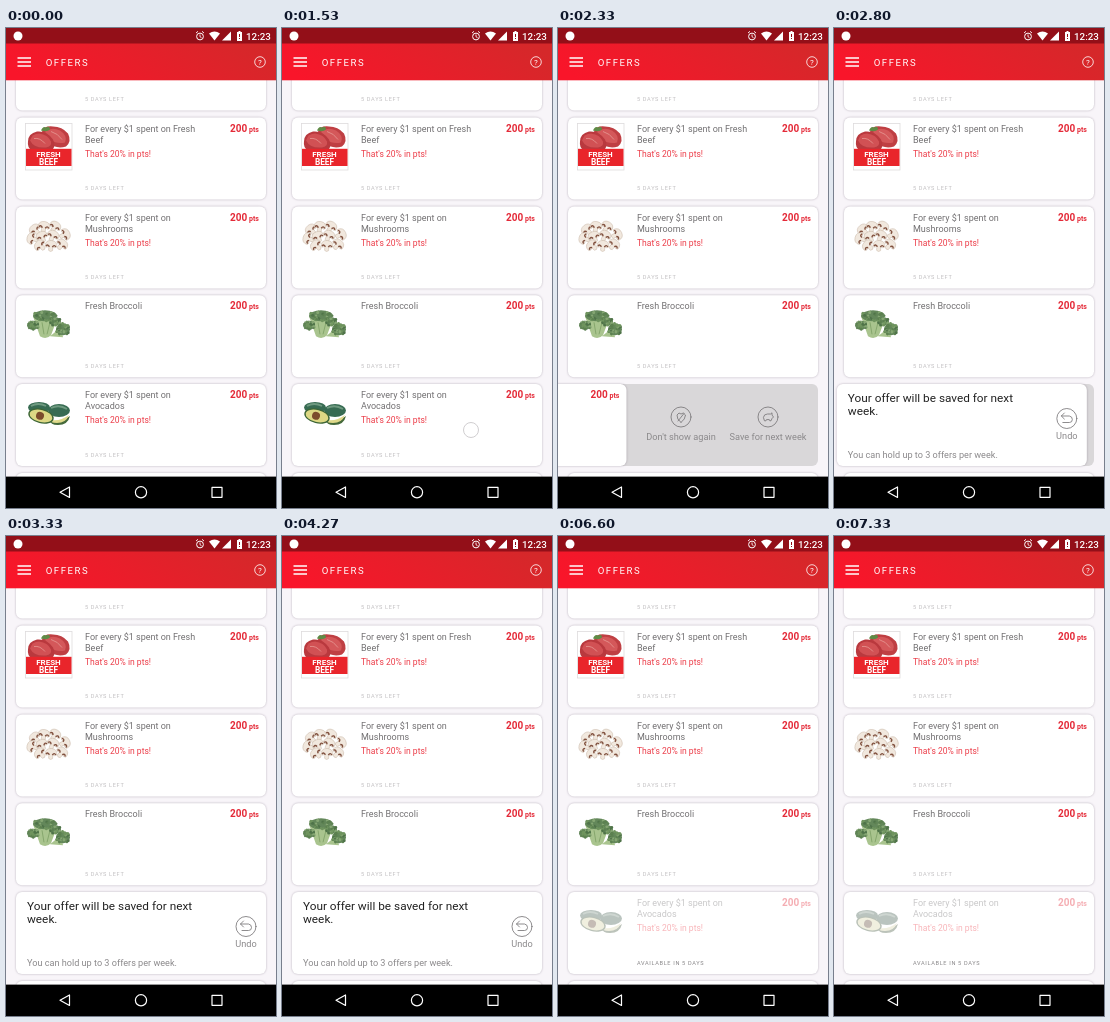
Write an HTML page that moves like this. It is 270x480 px and loops after 7540 ms.

```html
<!DOCTYPE html>
<html lang="en">
<head>
<meta charset="utf-8">
<title>Offers</title>
<style>
  html, body { margin: 0; width: 100%; height: 100%; overflow: hidden; background: #f8f5f9; }
  svg { display: block; width: 270px; height: 480px; font-family: Roboto, "Noto Sans", sans-serif; }
  .face { fill: #fff; filter: drop-shadow(0 .8px 1.1px rgba(70, 52, 76, .34)); }
  .title { font-size: 9px; fill: #727072; }
  .bonus { font-size: 8.55px; fill: #ec3d49; }
  .note { font-size: 5.6px; letter-spacing: .65px; fill: #c0bec0; }
  .pts { font-size: 10px; font-weight: 700; fill: #e42a38; }
  .unit { font-size: 7px; }
  .label { font-size: 9.2px; fill: #8b898b; text-anchor: middle; }
  .line { fill: none; stroke: #7a787a; stroke-width: .85; stroke-linecap: round; stroke-linejoin: round; }
  .white { fill: none; stroke: #fff; }
  .dim { opacity: .38; }
</style>
</head>
<body>
<svg viewBox="0 0 270 480">
  <defs>
    <linearGradient id="bar" x1="0" y1=".6" x2="1" y2=".4">
      <stop offset="0" stop-color="#f9152a"/>
      <stop offset="1" stop-color="#d5282a"/>
    </linearGradient>
    <g id="beef">
      <rect x="9.500" y="6" width="46.500" height="46.500" fill="#fff" stroke="#dedbdd" stroke-width=".8"/>
      <path d="M26 14 Q28 8 37 9 Q46 9 52 16 Q56 24 50 29 Q40 32 32 25Z" fill="#bf3f43"/>
      <path d="M29 14 Q36 9 44 13 Q52 18 49 25 Q41 27 34 22Z" fill="#d4585a"/>
      <path d="M12 24 Q12 16 21 14 Q31 13 37 22 Q40 29 36 33 L16 33 Q11 30 12 24Z" fill="#b9393e"/>
      <path d="M14 23 Q16 16 23 16 Q32 17 35 24 Q36 29 30 30 Q18 31 14 23Z" fill="#d15154"/>
      <path d="M18 21 Q24 20 29 26 M35 14 Q42 16 46 22" fill="none" stroke="#e89a95" stroke-width=".8"/>
      <path d="M25 13 Q27 8 30 10 Q34 8 34 12 Q31 15 25 13Z" fill="#5f8b46"/>
      <rect x="10" y="31.300" width="45.500" height="17.200" fill="#e9252b"/>
      <g font-weight="700" fill="#fff" text-anchor="middle">
        <text x="32.500" y="39.300" font-size="8">FRESH</text>
        <text x="32.500" y="47.400" font-size="8.300">BEEF</text>
      </g>
    </g>
    <g id="slice">
      <path d="M-6 1 Q-6 -5 0 -5 Q6 -5 6 1 Q4 3 2 1 L2 5 Q0 7 -2 5 L-2 1 Q-4 3 -6 1Z" fill="#f1e8de" stroke="#c9b8a8" stroke-width=".5"/>
      <path d="M-5 1 Q-3 -1.500 -1.500 1.500 M5 1 Q3 -1.500 1.500 1.500" fill="none" stroke="#80503e" stroke-width="1.400"/>
    </g>
    <g id="avocado">
      <g fill="#376b52">
        <ellipse cx="23" cy="23.500" rx="11" ry="5.500"/>
        <ellipse cx="43" cy="26.500" rx="11" ry="6.500"/>
      </g>
      <path d="M15 22 Q22 18 30 22 M35 24 Q43 20 51 25" fill="none" stroke="#6f9a80" stroke-width="1.800"/>
      <path d="M34 36 Q43 40 54 32 Q52 41 42 41 Q34 41 34 36Z" fill="#45693a"/>
      <path d="M32 35 Q42 39 53 31 Q50 39 41 39 Q34 39 32 35Z" fill="#dfd98a"/>
      <g transform="rotate(14 25 32)">
        <ellipse cx="25" cy="32" rx="13" ry="7.300" fill="#3d6636"/>
        <ellipse cx="25" cy="32" rx="11.600" ry="6" fill="#ddd884"/>
        <circle cx="24" cy="32" r="4" fill="#7c4c2c"/>
      </g>
    </g>
    <g id="mushroom"></g>
    <g id="broccoli"></g>
  </defs>

  <rect width="270" height="480" fill="#f8f5f9"/>
  <g id="list"></g>

  <g id="panel" transform="translate(10 356)">
    <rect width="250" height="82" rx="6" fill="#d9d7d9"/>
    <g class="line">
      <circle cx="113" cy="33" r="10"/>
      <path d="M113 38.500 Q108.500 35 109 31 Q111 27.500 113 30 Q115.500 27.500 117.500 31 Q117.500 35 113 38.500 M116 29.500 L110 37"/>
      <circle cx="200" cy="33" r="10"/>
      <path d="M195.500 33 Q196 30 199.500 30 L202.500 30 L204 28.800 L204 31 L205.500 33 L204 34.500 L203 36.800 L201.800 36.800 L201.300 35.600 L198.500 35.600 L198 36.800 L196.800 36.800Z"/>
    </g>
    <text class="label" x="113" y="56.300">Don't show again</text>
    <text class="label" x="200" y="56.300">Save for next week</text>
  </g>

  <g id="moving"></g>
  <g id="resting"></g>

  <g id="message">
    <rect class="face" width="250" height="82" rx="6"/>
    <g font-size="11.800" fill="#222">
      <text x="11" y="17.500">Your offer will be saved for next</text>
      <text x="11" y="31">week.</text>
    </g>
    <text x="11" y="74" font-size="9.150" fill="#8b898b">You can hold up to 3 offers per week.</text>
    <g class="line">
      <circle cx="230" cy="34.500" r="10"/>
      <path d="M227.500 29 L224.500 32 L227.500 35 M224.500 32 L232.500 32 Q235.500 32.500 235.500 35.500 Q235.500 38.500 232.500 38.500 L226 38.500"/>
    </g>
    <text class="label" x="230" y="55">Undo</text>
  </g>

  <circle id="touch" r="7.500" fill="#fff" fill-opacity=".65" stroke="#cbc9cb" stroke-width=".9"/>

  <rect y="15" width="270" height="37.300" fill="url(#bar)"/>
  <rect width="270" height="15.500" fill="#930f18"/>
  <circle cx="12" cy="8" r="4.500" fill="#fff"/>
  <g class="white">
    <circle cx="194" cy="8.500" r="3.400"/>
    <path d="M194 6.500 V8.700 L195.500 9.700 M190 5 L192 3.300 M198 5 L196 3.300" stroke-width=".9"/>
    <path d="M11.500 30 H25 M11.500 34 H25 M11.500 38 H25" stroke-width="1.400"/>
    <circle cx="254" cy="34" r="5.300" stroke-width=".8"/>
  </g>
  <g fill="#fff">
    <path d="M203 5.500 Q208.500 1.500 214 5.500 L208.500 12.500Z"/>
    <path d="M225 3.500 V12.500 H216Z"/>
    <path d="M231 4 H232.500 V3 H234.500 V4 H236 V13 H231Z"/>
    <text x="240" y="12.200" font-size="9.800" font-weight="500">12:23</text>
    <text x="39.700" y="37.800" font-size="9.600" letter-spacing="1.550">OFFERS</text>
    <text x="254" y="36.800" font-size="8" text-anchor="middle">?</text>
  </g>
  <path d="M233.500 6 V9 M233.500 10 V11" stroke="#930f18"/>

  <rect y="448.600" width="270" height="31.400"/>
  <g class="white" stroke-width="1.200" stroke-linejoin="round">
    <path d="M63.500 459 V469.500 L54 464.250Z"/>
    <circle cx="135" cy="464.300" r="5.600"/>
    <rect x="206" y="459.300" width="10" height="10"/>
  </g>
</svg>

<script>
const $ = id => document.getElementById(id);
const LOOP = 7540, ROW = 356;
const moving = $('moving'), resting = $('resting'), message = $('message');
const panel = $('panel'), touch = $('touch');

// Produce
const slices = [
  [19, 23, -40], [28, 20, 10], [39, 20, 30], [16, 32, -75], [26, 30, -20],
  [37, 29, 25], [49, 28, 65], [24, 39, -50], [35, 39, 5], [46, 38, 40]
];
$('mushroom').innerHTML = slices.map(([x, y, turn]) =>
  `<use href="#slice" transform="translate(${x} ${y}) rotate(${turn})"/>`).join('');

let seed = 7;
const random = () => (seed = seed * 16807 % 2147483647) / 2147483647;
const greens = ['#5c8150', '#6f945e', '#85a673', '#4f7349'];

function floret(cx, cy, rx, ry) {
  let dots = `<ellipse cx="${cx}" cy="${cy}" rx="${rx}" ry="${ry}" fill="#63875a"/>`;
  for (let i = 0; i < 26; i++) {
    const a = random() * Math.PI * 2, r = Math.sqrt(random());
    const x = (cx + Math.cos(a) * rx * r).toFixed(1);
    const y = (cy + Math.sin(a) * ry * r).toFixed(1);
    dots += `<circle cx="${x}" cy="${y}" r="${(.8 + random() * .8).toFixed(1)}" fill="${greens[i % 4]}"/>`;
  }
  return dots;
}
$('broccoli').innerHTML =
  '<path d="M17 21 L24 41 Q30 45 35 40 L41 24Z M34 41 L47 42 L45 32Z" fill="#a9c48e"/>' +
  '<path d="M26 27 L28 39 M34 27 L31 39" stroke="#86a76d" fill="none"/>' +
  floret(29, 20.5, 12, 5.5) + floret(17, 30, 6, 4.5) + floret(39, 26, 6, 4) + floret(47, 34, 7, 6);

// Cards
function offer({ art, lines, bonus, note = '5 DAYS LEFT', dim }) {
  const titles = lines.map((s, i) =>
    `<text class="title" x="69" y="${14 + i * 11}">${s}</text>`).join('');
  const extra = bonus ? '<text class="bonus" x="69" y="39.300">That\'s 20% in pts!</text>' : '';
  return `<rect class="face" width="250" height="82" rx="6"/>
    <g class="${dim ? 'dim' : ''}"><use href="#${art}"${dim ? ' style="filter:saturate(.5)"' : ''}/>${titles}${extra}
    <text class="pts" x="214" y="14">200<tspan class="unit" x="233">pts</tspan></text></g>
    <text class="note" x="69" y="72.500"${dim ? ' style="fill:#858385"' : ''}>${note}</text>`;
}

const spent = 'For every $1 spent on';
const rows = [
  [89.5, { art: 'beef', lines: [spent + ' Fresh', 'Beef'], bonus: true }],
  [178.5, { art: 'mushroom', lines: [spent, 'Mushrooms'], bonus: true }],
  [267.3, { art: 'broccoli', lines: ['Fresh Broccoli'] }]
];
const avocado = { art: 'avocado', lines: [spent, 'Avocados'], bonus: true };

$('list').innerHTML =
  `<g transform="translate(10 .5)"><rect class="face" width="250" height="82" rx="6"/>
   <text class="note" x="69" y="72.500">5 DAYS LEFT</text></g>` +
  rows.map(([y, o]) => `<g transform="translate(10 ${y})">${offer(o)}</g>`).join('') +
  `<rect class="face" x="10" y="445" width="250" height="30" rx="6"/>`;
moving.innerHTML = offer(avocado);
resting.innerHTML = offer({ ...avocado, note: 'AVAILABLE IN 5 DAYS', dim: true });

// Motion
const easeInOut = p => p * p * (3 - 2 * p);
const easeOut = p => 1 - (1 - p) ** 3;
const phase = (t, a, b) => Math.min(1, Math.max(0, (t - a) / (b - a)));
const pulse = (t, a, b, c, d) => phase(t, a, b) * (1 - phase(t, c, d));
const show = (el, on) => { el.style.display = on ? '' : 'none'; };
const place = (el, x, y) => el.setAttribute('transform', `translate(${x.toFixed(2)} ${y})`);

function draw(t) {
  const drag = -191.5 * easeInOut(phase(t, 1580, 2040));
  const slide = -265 * (1 - easeOut(phase(t, 2500, 2930)));
  const fade = easeInOut(phase(t, 6070, 6530));

  show(panel, t > 1580 && t < 2930);
  show(moving, t < 2700);
  show(message, t > 2500 && t < 6530);
  show(resting, t >= 6070);
  place(moving, 10 + drag, ROW);
  place(message, 10 + slide, ROW);
  place(resting, 10, ROW);
  message.style.opacity = 1 - fade;

  const swiping = t < 2250;
  place(touch, swiping ? 189 + drag : 210, swiping ? 402 : 397);
  touch.style.opacity = swiping
    ? pulse(t, 1460, 1510, 2040, 2100)
    : pulse(t, 2400, 2450, 2520, 2590);
}

const start = performance.now();
function tick() {
  draw((performance.now() - start) % LOOP);
  requestAnimationFrame(tick);
}
tick();
</script>
</body>
</html>
```
